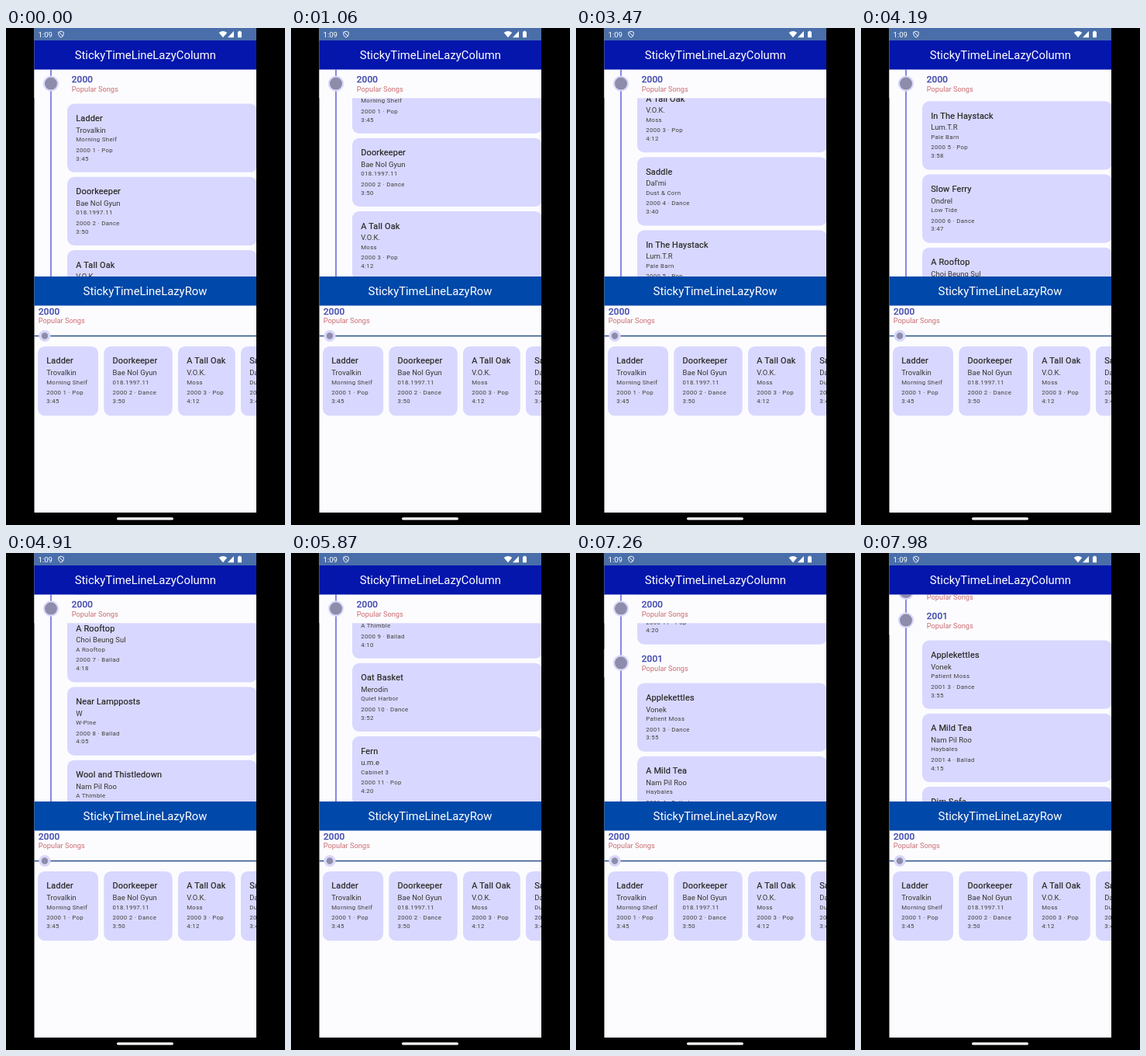
Write an HTML page that moves like this. It is 360 px wide and 640 px high and loops after 8000 ms.

```html
<!DOCTYPE html>
<html lang="en">
<head>
<meta charset="utf-8">
<title>Sticky timeline</title>
<style>
  html, body { margin: 0; width: 100%; height: 100%; overflow: hidden; background: #000; }
  svg { display: block; width: 360px; height: 640px; font-family: Roboto, sans-serif; }
  .bar { font-size: 14.85px; fill: #fff; text-anchor: middle; }
  .clock { font-size: 9.6px; fill: #fff; }
  .year { font-size: 11.7px; fill: #4049ac; stroke: #4049ac; stroke-width: .45px; letter-spacing: .25px; }
  .sub { font-size: 9.3px; fill: #cb6c70; }
  .card { fill: #d8d7ff; }
  .song { font-size: 10.9px; fill: #24241f; stroke: #24241f; stroke-width: .2px; letter-spacing: .2px; }
  .artist { font-size: 9.45px; fill: #36362f; letter-spacing: .08px; }
  .info { font-size: 7.8px; fill: #3e3e36; letter-spacing: .36px; }
  .halo { fill: #d9d8fa; }
  .dot { fill: #8d8cab; }
</style>
</head>
<body>
<svg viewBox="0 0 360 640">
  <defs>
    <clipPath id="screen"><rect x="36.5" width="286.5" height="624"/></clipPath>
    <clipPath id="list"><rect x="36" y="53.5" width="287" height="266.5"/></clipPath>
  </defs>
  <rect width="360" height="640"/>
  <g clip-path="url(#screen)">
    <rect x="36" width="287" height="624" fill="#fcfcff"/>
    <g clip-path="url(#list)">
      <g id="cards"></g>
      <g id="heads"></g>
      <rect x="57" y="53" width="2" height="267" fill="#8986e6"/>
      <g id="dots"></g>
    </g>
    <rect x="36" width="287" height="16" fill="#496ea9"/>
    <text class="clock" x="41.5" y="12">1:09</text>
    <g fill="none" stroke="#fff" stroke-width=".9">
      <path d="M71 4.2L74.3 5.4V8Q74.1 10.8 71 12.2Q67.9 10.8 67.7 8V5.4Z"/>
      <path d="M68.5 5.2L73.5 10.8"/>
    </g>
    <g fill="#fff">
      <path d="M274.7 6Q280 2 285.3 6L280 12.3Z"/>
      <path d="M286 12.3L294 4V12.3Z"/>
      <path d="M299 4.8H300.3V3.8H302.7V4.8H304V12.3H299Z"/>
    </g>
    <rect x="36" y="16" width="287" height="37.5" fill="#0416ac"/>
    <text class="bar" x="179.8" y="40.2">StickyTimeLineLazyColumn</text>
    <rect x="36" y="320" width="287" height="37.5" fill="#0048a9"/>
    <text class="bar" x="179.5" y="344">StickyTimeLineLazyRow</text>
    <text class="year" x="42" y="368.8">2000</text>
    <text class="sub" x="41.7" y="380.4">Popular Songs</text>
    <rect x="36" y="395.8" width="287" height="1.5" fill="#2b5288"/>
    <circle class="halo" cx="50" cy="396.5" r="7.6"/>
    <circle class="dot" cx="50" cy="396.5" r="4.2"/>
    <g id="row"></g>
  </g>
  <rect x="143" y="630.2" width="73" height="3.2" rx="1.6" fill="#fff"/>
</svg>
<script>
const LOOP = 8000;
const PITCH = 94.2, HEAD = 36.5, TOP = 53.8, FIRST_CARD = 97.6;

// title, artist, album, rank and genre, length
const years = {
  2000: [
    ['Ladder', 'Trovalkin', 'Morning Shelf', '1 · Pop', '3:45'],
    ['Doorkeeper', 'Bae Nol Gyun', '018.1997.11', '2 · Dance', '3:50'],
    ['A Tall Oak', 'V.O.K.', 'Moss', '3 · Pop', '4:12'],
    ['Saddle', "Dal'mi", 'Dust & Corn', '4 · Dance', '3:40'],
    ['In The Haystack', 'Lum.T.R', 'Pale Barn', '5 · Pop', '3:58'],
    ['Slow Ferry', 'Ondrel', 'Low Tide', '6 · Dance', '3:47'],
    ['A Rooftop', 'Choi Beung Sul', 'A Rooftop', '7 · Ballad', '4:18'],
    ['Near Lampposts', 'W', 'W-Pine', '8 · Ballad', '4:05'],
    ['Wool and Thistledown', 'Nam Pil Roo', 'A Thimble', '9 · Ballad', '4:10'],
    ['Oat Basket', 'Merodin', 'Quiet Harbor', '10 · Dance', '3:52'],
    ['Fern', 'u.m.e', 'Cabinet 3', '11 · Pop', '4:20'],
  ],
  2001: [
    ['Applekettles', 'Vonek', 'Patient Moss', '3 · Dance', '3:55'],
    ['A Mild Tea', 'Nam Pil Roo', 'Haybales', '4 · Ballad', '4:15'],
    ['Dim Sofa', 'Ondrel', 'Tin Roof', '5 · Ballad', '4:02'],
  ],
};

const $ = id => document.getElementById(id);
const label = (cls, x, y, s) =>
  `<text class="${cls}" x="${x}" y="${y}">${s.replace('&', '&amp;')}</text>`;

function card(year, [song, artist, album, rank, length], x, y, width, height) {
  const tx = x + 11.2;
  return `<rect class="card" x="${x}" y="${y}" width="${width}" height="${height}" rx="9"/>` +
    label('song', tx, y + 22.5, song) +
    label('artist', tx, y + 37, artist) +
    label('info', tx, y + 48.6, album) +
    label('info', tx, y + 62, `${year} ${rank}`) +
    label('info', tx, y + 72.9, length);
}

const offset2001 = FIRST_CARD - TOP + years[2000].length * PITCH;
const sections = [[2000, 0], [2001, offset2001]];
$('cards').innerHTML = sections.map(([year, start]) => years[year].map((s, i) =>
  card(year, s, 79, FIRST_CARD + start + i * PITCH, 245, 88.2)).join('')).join('');
$('heads').innerHTML = sections.map(([year]) =>
  `<g><rect x="36" width="287" height="${HEAD}" fill="#fcfcff"/>` +
  label('year', 84.8, 16.4, String(year)) + label('sub', 84.7, 28.1, 'Popular Songs') + '</g>').join('');
$('dots').innerHTML = sections.map(() =>
  '<g><circle class="halo" cx="58" cy="17.8" r="10.2"/><circle class="dot" cx="58" cy="17.8" r="8"/></g>').join('');
$('row').innerHTML = [[41, 78], [126.3, 88.5], [222, 73.8], [303, 90]].map(([x, w], i) =>
  card(2000, years[2000][i], x, 409.9, w, 89.4)).join('');

// time, scroll distance, speed in px per ms
const path = [
  [500, 0, .04], [1060, 50, .1], [2180, 155.3, .095], [2740, 200, .05],
  [3190, 200, .02], [3470, 214, .1], [3950, 305, .32],
  [4910, 584.5, .262], [6600, 928.3, .147], [7980, 1065, .052],
];

function scrollAt(t) {
  if (t <= 500) return 0;
  if (t >= 2740 && t < 3190) return 200;
  const i = path.findIndex(p => p[0] > t);
  if (i < 0) return path.at(-1)[1];
  const [t0, y0, v0] = path[i - 1], [t1, y1, v1] = path[i];
  const d = t1 - t0, u = (t - t0) / d, w = 1 - u;
  return w * w * ((1 + 2 * u) * y0 + u * d * v0) + u * u * ((3 - 2 * u) * y1 - w * d * v1);
}

// The picture refreshes in bursts: 20, 20, then 100 ms.
function refreshTime(t) {
  if (t < 500) return 0;
  const start = t < 3190 ? 500 : t < 6560 ? 3190 : 6560;
  const phase = (t - start) % 140;
  return t - phase + (phase < 20 ? 0 : phase < 40 ? 20 : 40);
}

function draw(now) {
  const y = scrollAt(refreshTime(now % LOOP));
  const next = TOP + offset2001 - y;
  const tops = [Math.min(TOP, next - HEAD), Math.max(TOP, next)];
  $('cards').setAttribute('transform', `translate(0 ${-y})`);
  tops.forEach((top, i) => {
    for (const id of ['heads', 'dots'])
      $(id).children[i].setAttribute('transform', `translate(0 ${top})`);
  });
}

const begin = performance.now();
function tick() {
  draw(performance.now() - begin);
  requestAnimationFrame(tick);
}
tick();
</script>
</body>
</html>
```
